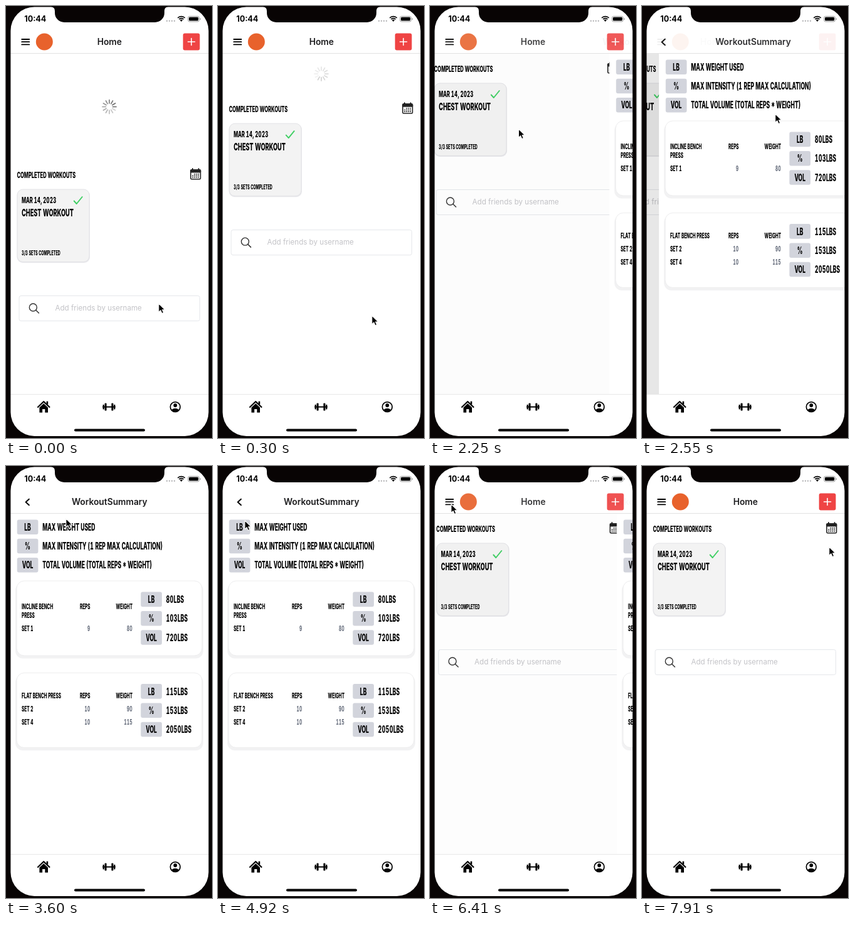
An HTML page for the animation above (8000 ms loop, 329 by 688 pixels).

```html
<!DOCTYPE html>
<html lang="en">
<head>
<meta charset="utf-8">
<title>Workout app</title>
<style>
  html, body { margin: 0; width: 100%; height: 100%; overflow: hidden; background: #080404; }
  svg { display: block; width: 100%; height: 100%; }
  text { font-family: Inter, Roboto, sans-serif; }
  .narrow { font-weight: 800; font-variant-numeric: tabular-nums; }
  .line { fill: none; stroke: #000; stroke-linecap: round; stroke-linejoin: round; }
</style>
</head>
<body>
<svg id="stage" viewBox="0 0 329 688" xmlns="http://www.w3.org/2000/svg">
  <text id="sample" class="narrow" font-size="96.5" visibility="hidden">COMPLETED WORKOUTS</text>
</svg>
<script>
const LOOP = 8000, STEP = 149;
const WIDTH = 316, PULL = 169;
const stage = document.getElementById('stage');
const sample = document.getElementById('sample');

// One ratio for the whole condensed face.
const ratio = 671 / sample.getComputedTextLength();

const rect = (x, y, w, h, r, fill, extra = '') =>
  `<rect x="${x}" y="${y}" width="${w}" height="${h}" rx="${r}" fill="${fill}" ${extra}/>`;
const line = (d, w, color = '#000') =>
  `<path class="line" d="${d}" style="stroke:${color}" stroke-width="${w}"/>`;
const dot = (x, y, r, fill) => `<circle cx="${x}" cy="${y}" r="${r}" fill="${fill}"/>`;

function narrow(x, y, size, str, anchor = 'start', fill = '#000') {
  const body = str.replace(/\d+/g, d => `<tspan letter-spacing=".06em">${d}</tspan>`);
  return `<text class="narrow" transform="translate(${x} ${y}) scale(${ratio} 1)" ` +
    `font-size="${size * 0.965}" text-anchor="${anchor}" fill="${fill}">${body}</text>`;
}

function calendar() {
  let s = rect(295, 92, 15.6, 14.8, 1.5, 'none', 'stroke="#222" stroke-width="1.6"') +
    rect(294.3, 91.3, 17, 5.2, 1.5, '#222') +
    rect(297, 89.3, 2, 3.5, 0.6, '#222') + rect(306.6, 89.3, 2, 3.5, 0.6, '#222');
  for (let i = 0; i < 11; i++) {
    const col = (i + 1) % 4, row = Math.floor((i + 1) / 4);
    s += rect(297.4 + col * 3, 98 + row * 2.6, 1.7, 1.6, 0.2, '#222');
  }
  return s;
}

function spinner() {
  let s = '';
  for (let i = 0; i < 12; i++)
    s += `<path d="M0-5.6V-11" stroke="#666" stroke-width="1.7" stroke-linecap="round" ` +
      `opacity="${0.3 + 0.7 * i / 11}" transform="rotate(${i * 30})"/>`;
  return `<g id="spinner">${s}</g>`;
}

function homePage() {
  return rect(7, 76, 317, 543, 0, '#fff') + spinner() +
    `<g id="list">` +
      narrow(17.5, 105, 14, 'COMPLETED WORKOUTS') + calendar() +
      rect(17.5, 124, 116.5, 116, 9, '#e9e9ec') +
      rect(18, 123, 115, 115.5, 9, '#f3f3f3', 'stroke="#e2e2e6"') +
      narrow(25, 145, 14, 'MAR 14, 2023') +
      narrow(25, 166.3, 17.2, 'CHEST WORKOUT') +
      narrow(25, 227.5, 10.3, '3/3 SETS COMPLETED') +
      line('M108.7 141.5L112.7 146L121.7 135', 1.9, '#3fcf63') +
      rect(21, 292.5, 288.5, 40, 3, '#fff', 'stroke="#e5e7eb"') +
      `<circle class="line" cx="43.3" cy="311" r="6" style="stroke:#333" stroke-width="1.4"/>` +
      line('M47.8 315.5L52.4 320', 1.5, '#333') +
      `<text x="78.5" y="316.2" font-size="11.6" fill="#c3c3c7">Add friends by username</text>` +
    `</g>`;
}

const pill = (x, cy, label) =>
  rect(x, cy - 11.8, 33.7, 23.6, 3, '#d2d4dc') + narrow(x + 16.8, cy + 5.6, 16, label, 'middle');

function pills(x, top, values) {
  return ['LB', '%', 'VOL'].map((label, i) => {
    const cy = top + i * 30.3;
    return pill(x, cy, label) + narrow(x + 40.5, cy + 5.6, 16, values[i]);
  }).join('');
}

function row(y, cells, fill) {
  return narrow(25, y, 12, cells[0]) +
    narrow(134.5, y, 12, cells[1], 'end', fill) + narrow(202, y, 12, cells[2], 'end', fill);
}

function exercise(top, title, second, sets, values) {
  const base = second ? 44.7 : 40.6;
  const first = second ? 35 : 21;
  return rect(15, top + 3, 300, 120.5, 12, '#f2f2f3') +
    rect(17, top, 296, 119, 12, '#fff', 'stroke="#ededee"') +
    row(top + base, [title, 'REPS', 'WEIGHT'], '#000') +
    (second ? narrow(25, top + base + 14.4, 12, second) : '') +
    sets.map((s, i) => row(top + base + first + i * 21, s, '#6b7280')).join('') +
    pills(215.3, top + 29.4, values);
}

function summaryPage() {
  return rect(7, 76, 317, 543, 0, '#fff') +
    pills(17.7, 97.2, ['MAX WEIGHT USED', 'MAX INTENSITY (1 REP MAX CALCULATION)',
      'TOTAL VOLUME (TOTAL REPS * WEIGHT)']) +
    exercise(183, 'INCLINE BENCH', 'PRESS', [['SET 1', '9', '80']],
      ['80LBS', '103LBS', '720LBS']) +
    exercise(329.5, 'FLAT BENCH PRESS', '', [['SET 2', '10', '90'], ['SET 4', '10', '115']],
      ['115LBS', '153LBS', '2050LBS']);
}

const title = (id, str) =>
  `<text id="${id}" x="165.3" y="62.2" font-size="13.8" font-weight="600" ` +
  `text-anchor="middle" fill="#1c1c1e">${str}</text>`;

function header() {
  return rect(0, 0, 329, 75.5, 0, '#fff') + rect(7, 75, 317, 1, 0, '#e2e2e2') +
    `<g id="homeBar">` +
      line('M25.2 53H37.2M25.2 57.2H37.2M25.2 61.4H37.2', 1.8) +
      dot(61.3, 57, 13.5, '#e8622c') +
      rect(282.7, 43.6, 26.8, 26.8, 3, '#ef4444') +
      line('M290.6 57H301.6M296.1 51.5V62.5', 1.6, '#fff') +
    `</g>` + title('homeTitle', 'Home') +
    `<g id="back">${line('M36.8 52.7L31.6 57.5L36.8 62.3', 2)}</g>` +
    title('sumTitle', 'WorkoutSummary');
}

function tabs() {
  const plates = rect(157.6, 632.6, 3, 12, 1, '#000') + rect(154.6, 634.8, 2.2, 7.6, 1, '#000');
  return rect(0, 618, 329, 70, 0, '#fff') + rect(7, 618, 317, 1, 0, '#e8e8e8') +
    line('M51 638.8L60.2 630L69.4 638.8', 2.2) + rect(64.6, 629.6, 2.6, 5, 0, '#000') +
    `<path d="M53.4 639.4L60.2 633L67 639.4V647.6H62.3V642H58.1V647.6H53.4Z"/>` +
    rect(154, 637.6, 21, 2, 1, '#000') + plates +
    `<g transform="translate(329 0) scale(-1 1)">${plates}</g>` +
    `<circle class="line" cx="270.3" cy="638.5" r="7.9" stroke-width="1.7"/>` +
    dot(270.3, 636, 2.9, '#000') +
    `<path d="M264.6 643.2C266.6 639.8 274 639.8 276 643.2A7.5 7.5 0 0 1 264.6 643.2Z"/>` +
    rect(109, 673.5, 113, 4, 2, '#000');
}

function bezel() {
  const screen = 'M7.4 39.4A38 38 0 0 1 45.4 1.4H72Q78 1.4 78 8V11A15 15 0 0 0 93 26H238' +
    'A15 15 0 0 0 253 11V8Q253 1.4 259 1.4H285.5A38 38 0 0 1 323.5 39.4V647' +
    'A38 38 0 0 1 285.5 685H45.4A38 38 0 0 1 7.4 647Z';
  const arc = r => `M${280 - r * 0.72} ${24.6 - r * 0.7}A${r} ${r} 0 0 1 ${280 + r * 0.72} ${24.6 - r * 0.7}`;
  return `<path fill="#080404" fill-rule="evenodd" d="M0 0H329V688H0Z${screen}"/>` +
    `<text x="46.8" y="25" font-size="12.5" font-weight="700" text-anchor="middle">10:44</text>` +
    [257, 261, 265, 269].map(x => dot(x, 23.8, 1.2, '#b9b9bb')).join('') +
    `<path d="${arc(8)}${arc(5)}" fill="none" stroke="#000" stroke-width="1.7"/>` +
    `<path d="${arc(3)}L280 25Z"/>` +
    rect(290.6, 16.4, 18, 8.6, 2.6, 'none', 'stroke="#999" stroke-width=".9"') +
    rect(292, 17.8, 15.2, 5.8, 1.5, '#000') + rect(309.7, 19.2, 1.2, 3, 0.6, '#999');
}

stage.innerHTML =
  `<g id="home">${homePage()}</g>` + rect(0, 76, 329, 543, 0, '#000', 'id="dim"') +
  `<g id="summary">${summaryPage()}</g>` + header() + tabs() + bezel() +
  `<path id="cursor" d="M.8 .8V14.6L4 11.7L6.1 16.6L8.7 15.5L6.6 10.8H11Z" ` +
  `stroke="#fff" stroke-width="1.1" stroke-linejoin="round"/>`;

const el = {};
stage.querySelectorAll('[id]').forEach(e => el[e.id] = e);
const move = (e, x, y) => e.setAttribute('transform', `translate(${x.toFixed(2)} ${y.toFixed(2)})`);
const fade = (e, a) => e.setAttribute('opacity', a.toFixed(3));
const clamp = v => Math.max(0, Math.min(1, v));

// Critically damped spring: 1 at the start, falling to 0.
function settle(x) {
  return x <= 0 ? 1 : (1 + x) * Math.exp(-x);
}

// Pointer path: step, x, y
const path = [
  [0, 243, 473], [1, 243, 475], [5, 251, 544], [6, 200, 430], [7, 118, 267], [8, 110, 230],
  [9, 105, 207], [14, 105, 207], [17, 212, 171], [21, 170, 125], [24, 95, 83], [25, 36, 98],
  [27, 150, 400], [28, 229, 492], [29, 99, 280], [31, 64, 160], [33, 42, 86], [35, 32, 64],
  [36, 32, 64], [37, 32.5, 60], [43, 33, 60], [47, 280, 513], [48, 261, 574], [51, 261, 574],
  [52, 283, 340], [53, 298, 128]
];

function pointer(n) {
  const i = Math.max(1, path.findIndex(p => p[0] >= n));
  const [a, ax, ay] = path[i - 1], [b, bx, by] = path[i];
  const f = (n - a) / (b - a);
  return [ax + (bx - ax) * f, ay + (by - ay) * f];
}

function draw(time) {
  const n = Math.floor((time % LOOP) / STEP);

  const pull = PULL * settle((n - 0.6) * 1.5);
  move(el.list, 0, pull);
  el.spinner.setAttribute('transform',
    `translate(165 ${76 + pull / 2}) rotate(${120 + n * 60})`);
  fade(el.spinner, clamp((pull - 40) / 80));

  const left = n < 30 ? settle((n - 14.7) * 1.935) : 1 - settle((n - 40.83) * 1.935);
  const shown = 1 - left;
  move(el.home, -0.3 * WIDTH * shown, 0);
  fade(el.dim, 0.1 * shown);
  move(el.summary, WIDTH * left, 0);

  fade(el.homeBar, left);
  fade(el.homeTitle, left ** 1.5);
  move(el.homeTitle, -60 * shown * shown, 0);
  fade(el.back, shown ** 1.5);
  fade(el.sumTitle, shown ** 1.5);
  move(el.sumTitle, 0.61 * WIDTH * left, 0);

  move(el.cursor, ...pointer(n));
}

const start = performance.now();
function frame() {
  draw(performance.now() - start);
  requestAnimationFrame(frame);
}
frame();
</script>
</body>
</html>
```
